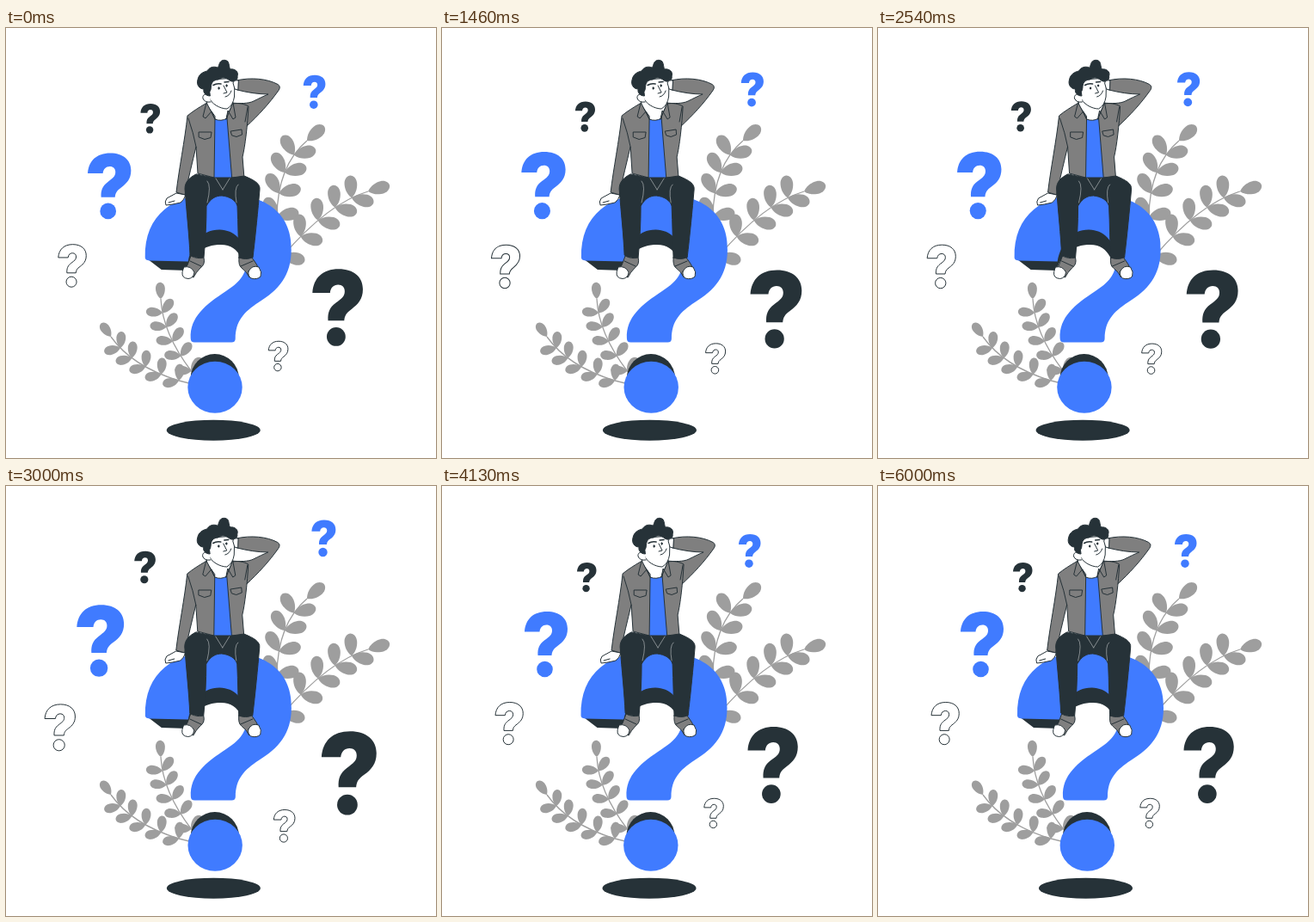
Animation, 500 px wide and 500 px high, one loop 6.04 s. Source, as an HTML page:

```html
<!DOCTYPE html>
<html lang="en">
<head>
<meta charset="utf-8">
<title>Thinking it over</title>
<style>
  html, body { margin: 0; width: 100%; height: 100%; overflow: hidden; background: #fff; }
  svg { display: block; width: 100%; height: 100%; }
  .blue { fill: #407bff; }
  .dark { fill: #263238; }
  .leaves { fill: #9e9e9e; }
  .stem { fill: none; stroke: #9e9e9e; stroke-width: 1.3; }
  #body { stroke: #263238; stroke-width: 1; stroke-linejoin: round; stroke-linecap: round; }
  .jacket { fill: #7f7f7f; }
  .white { fill: #fff; }
  .line { fill: none; }
  .seam { fill: none; stroke: #c4c8ca; stroke-width: .6; }
  .outline { fill: #fff; stroke: #263238; }
</style>
</head>
<body>
<svg viewBox="0 0 500 500">
  <defs>
    <path id="leaf" d="M0 0C5 -6 12 -7.500 17 -7.300C23 -7 26 -3 26 0S23 7 17 7.300C12 7.500 5 6 0 0Z"/>
    <g id="ask">
      <path vector-effect="non-scaling-stroke" d="M0 23.500C1 9 10 0 26 0C41 0 50 8 50 20C50 30 45 35 39 39.500C33.500 43.500 32 46 31.500 51H15.500C15 43 17 38 23 33.500C29 29 32 27 32 22C32 18 29.500 15.500 25.500 15.500C21 15.500 18 18.500 17.500 23.500Z"/>
      <circle vector-effect="non-scaling-stroke" cx="23.500" cy="67" r="9.300"/>
    </g>
  </defs>

  <g class="leaves" id="leaves"></g>

  <g id="mark">
    <ellipse class="dark" cx="241.500" cy="467.700" rx="54.500" ry="12"/>
    <path class="dark" d="M164 268L181 281L211 282C217 262 230 252 250 252C262 252 269 258 273 266L284 240L250 225L210 240Z"/>
    <path class="blue" d="M162 267C161 217 195 192.500 247 192C308 192 333 220 332 258C332 288 317 305 294 319C277 330 267 341 267 361Q267 365.500 262.500 365.500H219.500Q215 365.500 215 361C214 336 232 322 256 306C270 297 281 287 280 268C278 246 265 235 249 234.500C229 234 216 250 212 271.500L167 270.500Q162 270 162 267Z"/>
    <circle class="dark" cx="243" cy="407" r="28"/>
    <ellipse class="blue" cx="243.300" cy="417.800" rx="31.700" ry="30"/>
  </g>

  <g id="body">
    <path class="white" d="M209 194L198 192L187 198Q184 202 186 206L194 205L203 203Q207 200 209 194Z"/>
    <path class="line" d="M189 203L196 201"/>

    <path class="jacket" d="M268 61C285 57 304 59 316 65.500Q320 68 317 72.500C306 88 294 101 279 115L270 98L262 87C272 88 282 88 288 85C294 82 300 79 305 77C293 77 281 75 269 72Z"/>

    <path class="blue" d="M241 99H260L264 177H241Z"/>
    <path class="white" d="M235 78L233 92Q239 103 243 106Q250 109 257 105L264 90Z"/>

    <path class="jacket" d="M232 88C225 92 217 97 211 102C208 130 201 165 198 191L208 194C212 175 217 155 221 138L223 169L242 174L243 103Z"/>
    <path class="jacket" d="M257 102L264 88C270 87 277 88 282 91C281 112 278 138 275 150L277 175L263 174Z"/>
    <path class="line" d="M212 105Q218 122 221 138M281 92L278 109"/>
    <path class="jacket" d="M233 87L229 103L232 105L239 97L243 106ZM264 87L267 104L264 106L258 96L256 106Z"/>
    <path class="jacket" d="M224.500 121H239L238 127.500L231 129.500L224.500 127ZM261.500 120L274 118L274.500 124L268 126.500L263 125Z"/>

    <path class="dark" d="M221 170C213 174 208 179 208 187C210 214 213 241 214 264Q221 268 230 267C232 246 233 226 233 207C238 198 244 195 251 195C260 196 267 200 269 207C270 228 270 248 271 268Q279 270 287 267C290 242 293 211 295 188C296 181 289 177 277 172L263 174H241Z"/>
    <path class="seam" d="M234 178Q239 183 234 203M244 175L252 188M260 175L252 188M268 203Q265 186 270 182"/>

    <path class="jacket" d="M215 265Q222 269 230 267Q232 275 226 279Q221 284 218 290L206 285Q212 275 215 265Z"/>
    <path class="white" d="M207 278Q215 276 219 284Q218 291 212 291.500Q204 291 205 284Z"/>
    <path class="line" d="M214 271L227 277"/>
    <path class="jacket" d="M271 267Q279 270 286 267Q291 273 296 284L283 290Q280 283 274 279Q270 276 271 267Z"/>
    <path class="white" d="M282 283Q286 275 294 278Q298 284 296 289Q292 293 285 291Q281 288 282 283Z"/>
    <path class="line" d="M273 277L287 271"/>

    <path class="white" d="M236 66V80C238 88 249 94 257 94Q264 90 265.500 80L266 58L240 60Z"/>
    <path class="white" d="M237 78C232 75 228 78 229 82Q231 87 238 86"/>
    <path class="dark" d="M237 79C232 79 229 75 230 71C225 71 221 66 223 60C224 54 229 51 234 50C236 46 241 44 246 46C247 46 247 44 248 42C249 37 255 36 258 39C260 42 259 46 261 48C266 47 271 51 269 56C270 61 265 64 260 61C255 57 251 57 247 60C243 60 240 62 239 65C238 68 239 71 237 74Z"/>
    <path class="line" stroke-width="1.500" d="M241 66.500Q245 64 250 65M254 63L259 62.500"/>
    <path class="line" d="M253 67L257 75L253 76M255 80Q260 79 262 73"/>
    <ellipse class="dark" cx="247.500" cy="70" rx=".6" ry="1.300"/>
    <ellipse class="dark" cx="256.500" cy="67" rx=".6" ry="1.300"/>
    <path class="white" d="M270 61Q265 60 264 64L266 71L269.500 72Z"/>
  </g>

  <g id="asks">
    <use href="#ask" class="blue" transform="translate(96 146)"/>
    <use href="#ask" class="dark" transform="translate(355.500 280) scale(1.165)"/>
    <use href="#ask" class="dark" transform="translate(157 89) scale(.45)"/>
    <use href="#ask" class="blue" transform="translate(345 56) scale(.51)"/>
    <use href="#ask" class="outline" transform="translate(62 251.500) scale(.645)"/>
    <use href="#ask" class="outline" transform="translate(304.800 363.300) scale(.45)"/>
  </g>
</svg>
<script>
  const $ = id => document.getElementById(id);

  // A stem is a quadratic curve with leaf pairs at even steps and one leaf at its tip.
  function branch(root, bend, tip, pairs, sides, size) {
    const at = t => root.map((r, i) =>
      (1 - t) ** 2 * r + 2 * t * (1 - t) * bend[i] + t * t * tip[i]);
    const leaf = (t, turn) =>
      `<use href="#leaf" transform="translate(${at(t)}) rotate(${turn}) scale(${size})"/>`;
    const end = Math.atan2(tip[1] - bend[1], tip[0] - bend[0]) * 180 / Math.PI;
    let art = `<path class="stem" d="M${at(-.2)}L${root}Q${bend} ${tip}"/>` + leaf(1, end);
    for (let i = 0; i < pairs; i++) art += sides.map(turn => leaf(i / pairs, turn)).join('');
    return art;
  }

  $('leaves').innerHTML =
    branch([315, 220], [315.5, 160.5], [350, 131], 4, [-120, -13], 1) +
    branch([322, 265], [374, 204], [421, 190], 5, [-94, 12], 1) +
    branch([215.5, 399], [182, 355], [180, 315], 5, [-175, -54], .74) +
    branch([201, 410], [146.5, 393.5], [122, 359], 5, [-86, 167], .74);

  // Linear interpolation between [position, value] stops.
  function track(stops, pos) {
    const i = Math.max(1, stops.findIndex(s => s[0] >= pos));
    const [p0, v0] = stops[i - 1], [p1, v1] = stops[i];
    return v0 + (v1 - v0) * (pos - p0) / (p1 - p0);
  }

  const beat = [[0, 1], [.1, 1.1], [.3, 1], [.4, 1], [.5, 1.1], [.6, 1], [1, 1]];
  const shake = [0, -1, 2, -4, 4, -4, 4, -4, 2, -1, 0].map((x, i) => [i / 10, x]);
  const shakeAt = ms => ms < 0 ? 0 : track(shake, ms % 1500 / 1500);

  const LOOP = 6040, STEPS = 145, CX = 237.5, CY = 226.8;
  const start = performance.now();

  function draw() {
    const t = (performance.now() - start) % LOOP;
    const step = Math.min(STEPS - 1, Math.floor((t + 5) * 24 / 1000));
    const pos = (step + 1) / STEPS, ms = pos * 6000;
    $('asks').setAttribute('transform',
      `translate(${CX} ${CY}) scale(${track(beat, pos)}) translate(${-CX} ${-CY})`);
    $('mark').setAttribute('transform', `translate(${shakeAt(ms)} 0)`);
    $('body').setAttribute('transform', `translate(${shakeAt(ms - 1000)} 0)`);
    requestAnimationFrame(draw);
  }
  draw();
</script>
</body>
</html>
```
